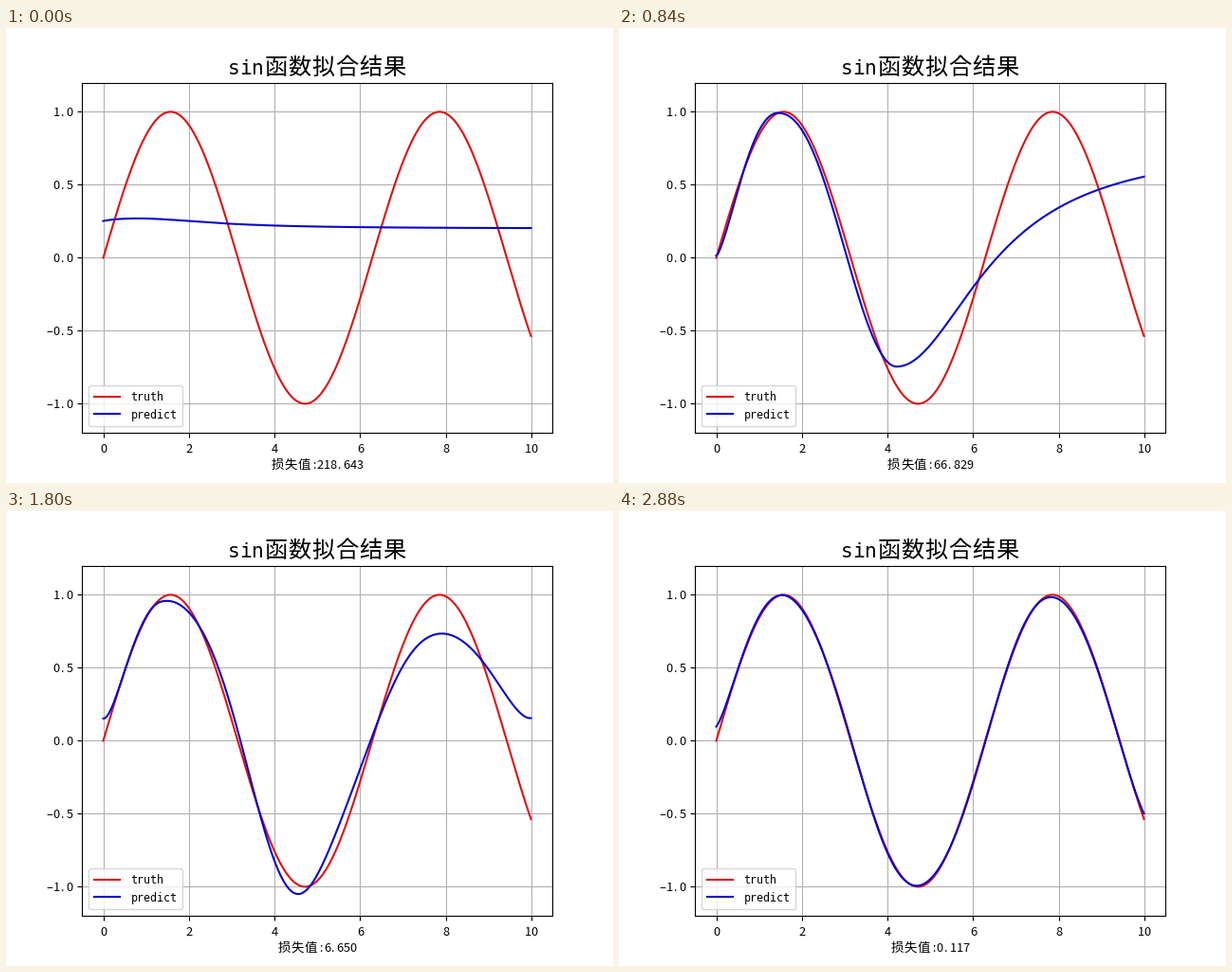
A matplotlib script that plays this animation: 640 px wide and 480 px high, repeating every 3 s.

```python
import numpy as np
import matplotlib.pyplot as plt
from matplotlib.animation import FuncAnimation
from matplotlib.transforms import IdentityTransform

STEPS, INTERVAL = 25, 120
W, H, DPI = 640, 480, 100
CJK, MONO = "Noto Sans CJK JP", "DejaVu Sans Mono"
RED, BLUE = "#e01010", "#0606cc"

LOSS_STEPS = [0, 5, 9, 13, 17, 21, 24]
LOSSES = [218.643, 87.420, 51.088, 46.843, 0.944, 0.192, 0.117]

# One hump and one trough drift while the network learns the first period.
LEARN_STEPS = [5, 9, 13]
LEARN = dict(
    start=[0.035, -0.005, 0.11],
    peak_x=[1.42, 1.45, 1.36], peak_y=[1.03, 0.953, 0.92],
    trough_x=[4.05, 4.38, 4.51], trough_y=[-0.468, -1.023, -1.118],
    rise=[0.78, 0.65, 0.78], fall=[0.87, 1.38, 1.47],
    lift=[1.18, 1.87, 1.9], width=[3.11, 1.68, 1.36],
)

x = np.arange(0, 10, 0.01)
truth = np.sin(x)


def swing(x0, y0, x1, y1, skew):
    """Half a cosine wave from one turning point to the next."""
    u = np.clip((x - x0) / (x1 - x0), 0, 1) ** skew
    return (y0 + y1) / 2 + (y0 - y1) / 2 * np.cos(np.pi * u)


def flat():
    return 0.2 + 0.07 / (1 + ((x - 0.75) / 2.1) ** 2) - 0.01 * np.exp(-4 * x)


def learning(step):
    p = {k: np.interp(step, LEARN_STEPS, v) for k, v in LEARN.items()}
    peak, trough = (p["peak_x"], p["peak_y"]), (p["trough_x"], p["trough_y"])
    d2 = (x - trough[0]) ** 2
    return np.select(
        [x < peak[0], x < trough[0]],
        [swing(0, p["start"], *peak, p["rise"]),
         swing(*peak, *trough, p["fall"])],
        trough[1] + p["lift"] * d2 / (d2 + p["width"] ** 2))


def settled(step):
    """The sine with a fading hook at both ends and a slight ripple."""
    e = 0.2 * np.exp(-0.1 * max(step - 17, 0))
    head = 1.1 * np.exp(-5.5 * x) + 0.12 * np.cos(np.pi * (x - 1))
    tail = 6 * np.exp(3.5 * (x - 10)) - 2.2 * np.exp(-(x - 9) ** 2)
    return truth + e * head + e ** 2 * tail


def prediction(step):
    warm = np.clip(step / 5, 0, 1)
    done = np.clip((step - 13) / 4, 0, 1)
    early = (1 - warm) * flat() + warm * learning(step)
    return (1 - done) * early + done * settled(step)


fig = plt.figure(figsize=(W / DPI, H / DPI), dpi=DPI, facecolor="white")
ax = fig.add_subplot()


def cells(px, py, text, size, align=0.5):
    """Write text on a half/full-width grid; px, py are pixels."""
    em = size * DPI / 72
    widths = [em / 2 if c.isascii() else em for c in text]
    left = px - align * sum(widths)
    out = []
    for c, w in zip(text, widths):
        if c.isascii() and c.isalpha():
            font, scale = MONO, 0.85
        else:
            font, scale = CJK, 0.92 if c.isascii() else 0.97
        shift = 0.3 if c == "." else 0.5
        glyph = "–" if c == "-" else c
        out.append(fig.text(left + shift * w, py, glyph, ha="center",
                            va="baseline", family=font, size=size * scale,
                            transform=IdentityTransform()))
        left += w
    return out


ax.plot(x, truth, color=RED, label="truth")
predict, = ax.plot(x, flat(), color=BLUE, label="predict")
margin = 0.05 * x[-1]
ax.set_xlim(-margin, x[-1] + margin)
ax.set_ylim(-1.2, 1.2)
x_ticks, y_ticks = np.arange(0, 11, 2), np.arange(-1, 1.1, 0.5)
ax.set_xticks(x_ticks)
ax.set_yticks(y_ticks)
ax.tick_params(labelbottom=False, labelleft=False)
ax.grid(True)
ax.legend(loc="lower left", prop={"family": MONO, "size": 10 / 1.2},
          borderpad=0.48, handlelength=2.4, handletextpad=0.96,
          handleheight=0.85, labelspacing=0.5, borderaxespad=0.6)

cells(328, 431, "sin函数拟合结果", 18)
for v in x_ticks:
    cells(ax.transData.transform((v, 0))[0], 32.5, str(v), 10)
for v in y_ticks:
    cells(70.3, ax.transData.transform((0, v))[1] - 4.8, f"{v:.1f}", 10, 1)

loss_text = []


def update(step):
    predict.set_ydata(prediction(step))
    loss = np.exp(np.interp(step, LOSS_STEPS, np.log(LOSSES)))
    for t in loss_text:
        t.remove()
    loss_text[:] = cells(328, 15, f"损失值:{loss:.3f}", 10)
    return [predict, *loss_text]


anim = FuncAnimation(fig, update, frames=STEPS, interval=INTERVAL,
                     init_func=lambda: update(0), repeat=True, repeat_delay=0,
                     blit=False)
plt.show()
```
